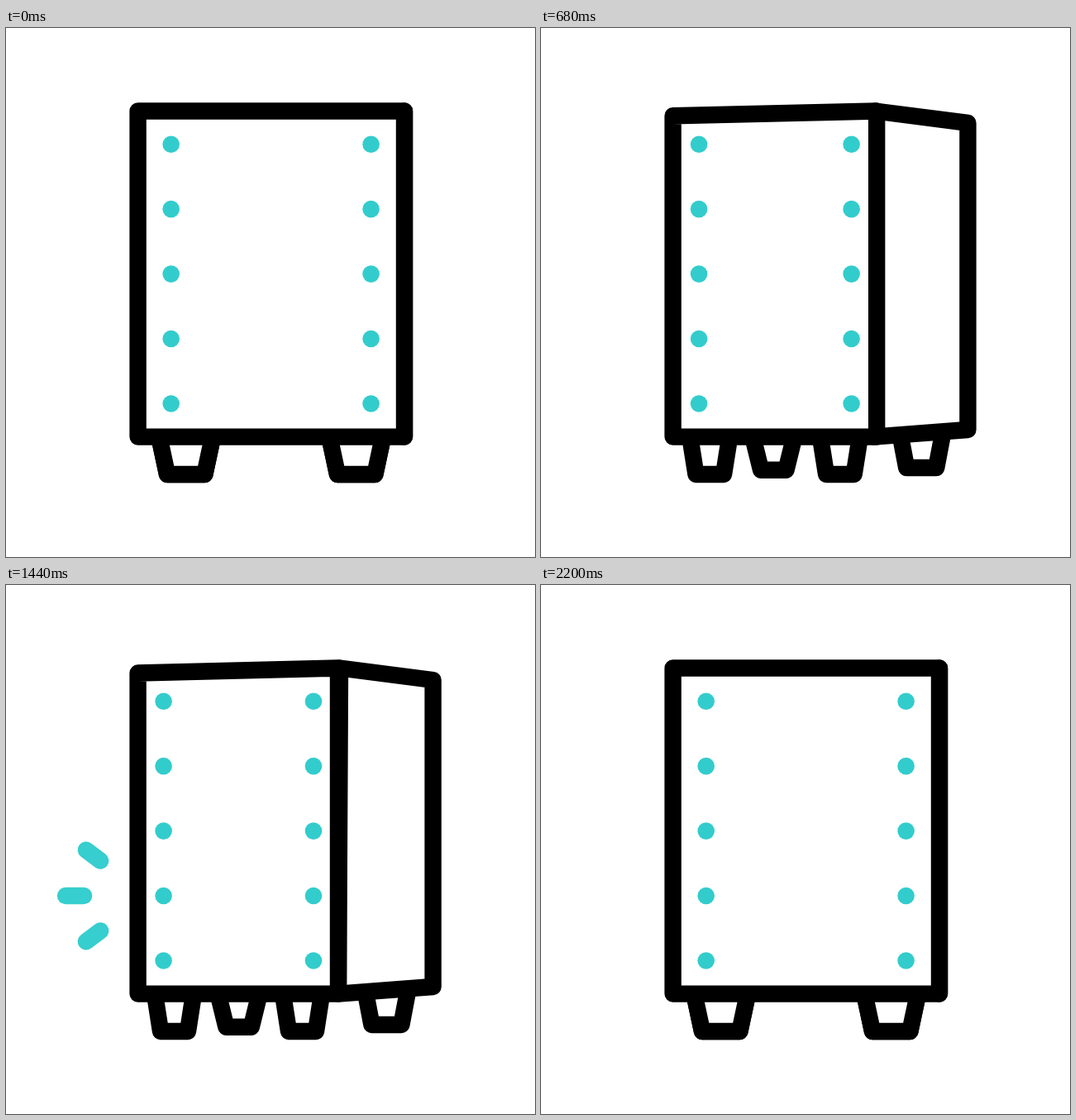
An HTML page with a canvas that plays this animation: 640 px wide and 640 px high, repeating every 2.4 s.

```html
<!DOCTYPE html>
<html lang="en">
<head>
<meta charset="utf-8">
<title>Cabinet</title>
<style>
  html, body { margin: 0; width: 100%; height: 100%; overflow: hidden; background: #fff; }
  canvas { display: block; width: 100vmin; height: 100vmin; }
</style>
</head>
<body>
<canvas id="stage" width="640" height="640"></canvas>
<script>
const ctx = document.getElementById('stage').getContext('2d');
const LOOP = 2400, STEP = 20;
const TURN_IN = 200, TURN_OUT = 2200;
const FRONT_MS = 557, SIDE_MS = 500;
const PULSE_MS = 500, RING_MS = 210;
const TEAL = '#33cccc', GLOW = '#36cece';

const clamp = v => Math.min(1, Math.max(0, v));
const mix = (a, b, k) => a + (b - a) * k;
const ease = k => k * k * (3 - 2 * k);

// 0 = facing straight ahead, 1 = fully turned
function turn(t, ms) {
  return ease(clamp(Math.min(t - TURN_IN, TURN_OUT - t) / ms));
}

function poly(points, closed) {
  ctx.beginPath();
  points.forEach(([x, y]) => ctx.lineTo(x, y));
  if (closed) ctx.closePath();
  ctx.fillStyle = '#fff';
  ctx.strokeStyle = '#000';
  ctx.fill();
  ctx.stroke();
}

function leg(x, top, foot, topHalf, footHalf) {
  poly([[x - topHalf, top], [x - footHalf, foot], [x + footHalf, foot], [x + topHalf, top]]);
}

function dots(x) {
  ctx.fillStyle = TEAL;
  for (let i = 0; i < 5; i++) {
    ctx.beginPath();
    ctx.arc(x, 140.7 + i * 78.45, 10.3, 0, Math.PI * 2);
    ctx.fill();
  }
}

function cabinet(p, q) {
  const frontTop = mix(32.3, 23.5, p), frontFoot = mix(22.7, 16.5, p);
  const edge = mix(482, 402, p);

  leg(mix(217.7, 281.6, q), 495, mix(540, 534.7, q), mix(32.3, 25, q), mix(22.7, 15.2, q));
  leg(mix(423.7, 460.4, q), mix(495, 490, q), mix(540, 532, q), mix(32.3, 26, q), mix(22.7, 18, q));
  leg(mix(217.7, 203.5, p), 495, 540, frontTop, frontFoot);
  leg(mix(423.7, 358.5, p), 495, 540, frontTop, frontFoot);

  const far = mix(482, 516.6, q);
  poly([
    [mix(482, 404, q), 100.5], [far, mix(100.5, 115, q)],
    [far, mix(494.6, 486, q)], [mix(482, 402, q), 494.6]
  ], true);
  poly([[159.6, mix(100.5, 106.5, p)], [edge, 100.5], [edge, 494.6], [159.6, 494.6]], true);

  dots(mix(199.7, 190.6, p));
  dots(mix(441.6, 372, p));
}

function ray(x, y, dx, dy, from, to) {
  ctx.beginPath();
  ctx.moveTo(x + dx * from, y + dy * from);
  ctx.lineTo(x + dx * to, y + dy * to);
  ctx.stroke();
}

// A ring on the front and three rays leaving on one side
function pulse(t, ringY, x, y, dir) {
  if (t <= 0 || t >= PULSE_MS) return;
  ctx.strokeStyle = GLOW;
  if (t < RING_MS) {
    ctx.beginPath();
    ctx.arc(284, ringY, 44, 0, Math.PI * 2);
    ctx.stroke();
  }
  const from = clamp((t - 200) / 300), to = clamp(t / 300);
  ray(x, y, 33 * dir, 0, from, to);
  for (const s of [-1, 1]) ray(x - 18 * dir, y + 36.5 * s, 26 * dir, 19.5 * s, from, to);
}

function draw(now) {
  const t = Math.floor((now % LOOP) / STEP) * STEP;
  ctx.fillStyle = '#fff';
  ctx.fillRect(0, 0, 640, 640);
  ctx.lineWidth = 20.4;
  ctx.lineCap = ctx.lineJoin = 'round';
  cabinet(turn(t, FRONT_MS), turn(t, SIDE_MS));
  pulse(t - 750, 219, 455, 220.5, 1);
  pulse(t - 1150, 376, 104, 376, -1);
}

const start = performance.now();
function tick() {
  draw(performance.now() - start);
  requestAnimationFrame(tick);
}
tick();
</script>
</body>
</html>
```
